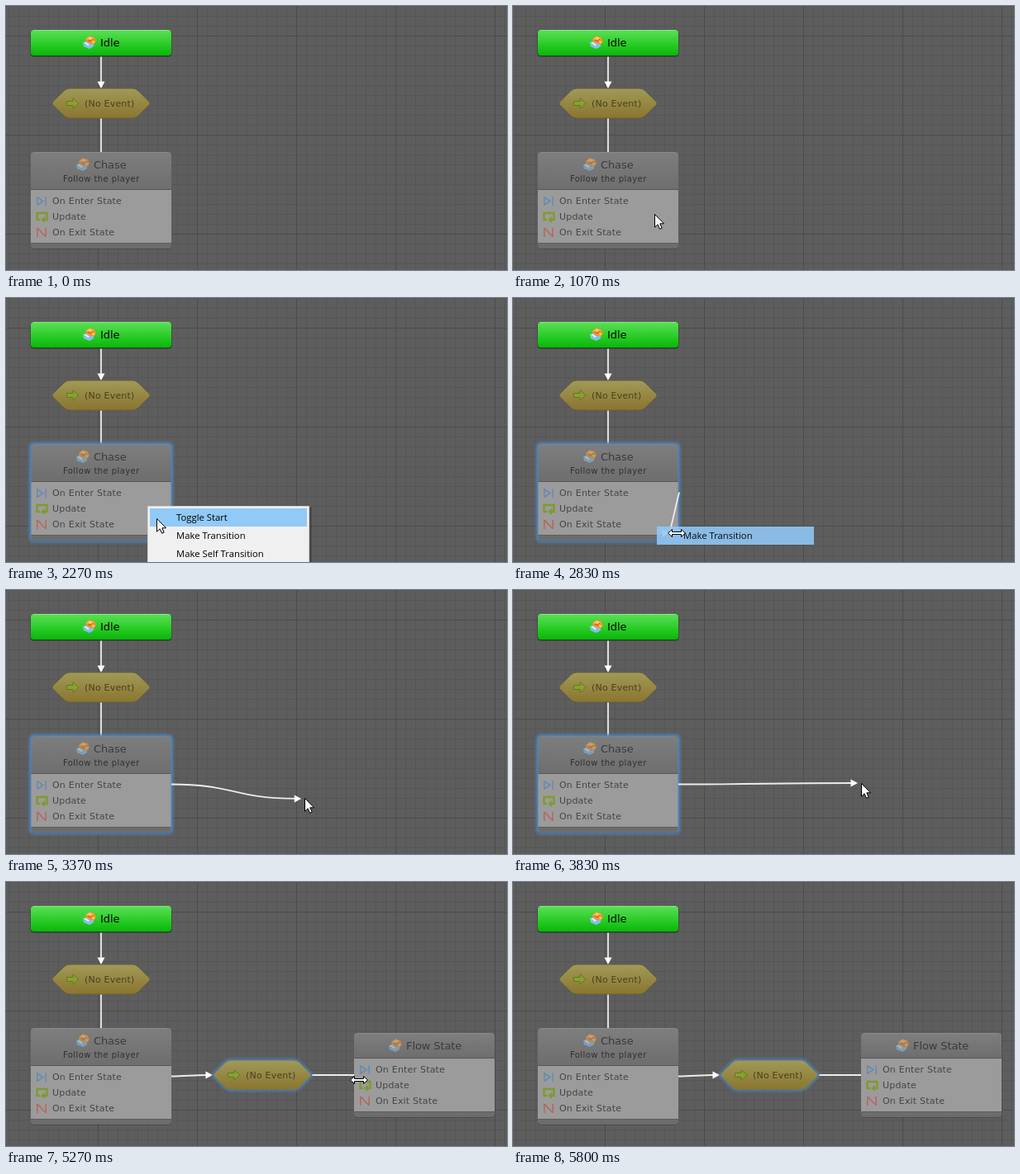
Recreate the animation shown at these times as an HTML page. Size 606 px wide and 320 px high, loop 7110 ms.

```html
<!DOCTYPE html>
<html lang="en">
<head>
<meta charset="utf-8">
<title>State graph</title>
<style>
  html, body { margin: 0; width: 100%; height: 100%; overflow: hidden; background: #5c5c5c; }
  svg { display: block; width: 606px; height: 320px; }
  text { font-family: "DejaVu Sans", Verdana, sans-serif; font-size: 11px; letter-spacing: .2px; white-space: pre; }
  .title { font-size: 13px; letter-spacing: -.1px; }
  .sub { font-size: 10px; letter-spacing: .42px; }
  .menu text { font-family: "Open Sans", "Segoe UI", sans-serif; font-size: 11.3px; letter-spacing: 0; fill: #000; }
  .edge { fill: none; stroke: #ececec; stroke-width: 1.8; }
  .head { fill: #fff; }
  .glow { fill: none; stroke: #4a86c6; stroke-width: 3; filter: url(#soft); }
  .rim { fill: none; stroke: #5583b3; stroke-width: 1; }
</style>
</head>
<body>
<svg id="stage" viewBox="0 0 606 320" xmlns="http://www.w3.org/2000/svg">
  <defs>
    <pattern id="minor" x="3" y="0" width="12" height="12" patternUnits="userSpaceOnUse">
      <path d="M.5 0V12M0 .5H12" stroke="#565656" fill="none"/>
    </pattern>
    <pattern id="major" x="111" y="36" width="120" height="120" patternUnits="userSpaceOnUse">
      <path d="M.5 0V120M0 .5H120" stroke="#4c4c4c" fill="none"/>
    </pattern>
    <linearGradient id="green" x2="0" y2="1">
      <stop offset="0" stop-color="#5cdf58"/><stop offset=".5" stop-color="#2fce2c"/><stop offset="1" stop-color="#08b808"/>
    </linearGradient>
    <linearGradient id="gray" x2="0" y2="1">
      <stop offset="0" stop-color="#7e7e7e"/><stop offset="1" stop-color="#6e6e6e"/>
    </linearGradient>
    <linearGradient id="gold" x2="0" y2="1">
      <stop offset="0" stop-color="#a09a57"/><stop offset="1" stop-color="#8a7530"/>
    </linearGradient>
    <filter id="soft" x="-20%" y="-20%" width="140%" height="140%"><feGaussianBlur stdDeviation="1.4"/></filter>

    <g id="machine">
      <path d="M3 4 8 0 14 2 16 7 13 11 7 10 3 8Z" fill="#f0932b"/>
      <path d="M4 4 8 1 13 3 10 5ZM11 6 15 7 12 10Z" fill="#ffc56e"/>
      <path d="M6 5 9 7 12 4" fill="none" stroke="#b85f16"/>
      <path d="M0 8 4 7 9 10 13 10 13 13 8 16 1 13Z" fill="#86bfe6"/>
      <path d="M1 8 4 8 8 11 6 12Z" fill="#e6f3fb"/>
    </g>
    <g id="enter" fill="none" stroke="#668bb3" stroke-width="1.5">
      <path d="M1.8 1V12M12.2 1V12M2 2 9 6.5 2 11"/>
    </g>
    <g id="update" fill="none" stroke="#7f9a2d" stroke-width="2.4">
      <path d="M5 10H1.5V2H13.5V10H10"/><path d="M11 6V14L6 10Z" fill="#7f9a2d" stroke="none"/>
    </g>
    <g id="exit" fill="none" stroke="#b9655c" stroke-width="1.5">
      <path d="M1.8 1V12M12.2 1V12M2.5 1.5 7 6.5 12 11.5"/>
    </g>
    <path id="go" d="M.5 4.5H8V.8L15 7 8 13.2V9.5H.5Z" fill="#87a52c" stroke="#5f7522"/>
    <path id="arrow" d="M.5.5V16.2L4.1 12.8 6.6 18.3 9.2 17.1 6.8 11.8H11.6Z" fill="#fff" stroke="#000"/>
    <path id="resize" d="M-10.5 0-5.5-4.5V-1.5H5.5V-4.5L10.5 0 5.5 4.5V1.5H-5.5V4.5Z" fill="#fff" stroke="#000"/>
  </defs>
  <rect width="606" height="320" fill="#5d5d5d"/>
  <rect width="606" height="320" fill="url(#minor)"/>
  <rect width="606" height="320" fill="url(#major)"/>
  <g id="graph"></g>
</svg>
<script>
const LOOP = 7110;
const HEX = 'M3 15 15 3Q18 0 22 0H98Q102 0 105 3L117 15Q121 18 117 21L105 33Q102 36 98 36H22Q18 36 15 33L3 21Q-1 18 3 15Z';
const $ = id => document.getElementById(id);

const label = (x, y, text, fill, cls = '') => `<text x="${x}" y="${y}" fill="${fill}" class="${cls}">${text}</text>`;
const icon = (id, x, y, opacity = 1) => `<use href="#${id}" x="${x}" y="${y}" opacity="${opacity}"/>`;
const head = (x, y, angle = 0) => `<path class="head" d="M-8.5-4.5 0 0-8.5 4.5Z" transform="translate(${x} ${y}) rotate(${angle})"/>`;
const edge = d => `<path class="edge" d="${d}"/>`;

function transition(x, y, glowing) {
  return `<g transform="translate(${x} ${y})">
    ${glowing ? `<path class="glow" d="${HEX}"/>` : ''}
    <path d="${HEX}" fill="url(#gold)" stroke="${glowing ? '#4d7497' : '#665e38'}" stroke-width=".8"/>
    ${icon('go', 18, 11, .9)}${label(40, 22, '(No Event)', '#48411f')}
  </g>`;
}

function stateNode(x, y, header, title, titleX, subtitle, glowId) {
  const height = header + 72, body = header + 1;
  const rows = [['enter', 'On Enter State'], ['update', 'Update'], ['exit', 'On Exit State']];
  return `<g transform="translate(${x} ${y})">
    ${glowId ? `<rect id="${glowId}" class="glow" x="-.5" y="-.5" width="171" height="${height + 1}" rx="4"/>` : ''}
    <rect y="1" width="170" height="${height}" rx="4" fill="#444" opacity=".6"/>
    <rect width="170" height="${height}" rx="4" fill="#6c6c6c"/>
    <path d="M0 ${header}V4Q0 0 4 0H166Q170 0 170 4V${header}Z" fill="url(#gray)"/>
    <path d="M4 .5H166" stroke="#8a8a8a"/>
    <path d="M0 ${header + .5}H170" stroke="#585858"/>
    <rect y="${body}" width="170" height="64" fill="#9b9b9b"/>
    <path d="M0 ${body + 64.5}H170" stroke="#5e5e5e"/>
    ${icon('machine', titleX - 21, 7, .55)}
    ${label(titleX, 20, title, '#3b3b3b', 'title')}
    ${subtitle ? label(39, 36, subtitle, '#303030', 'sub') : ''}
    ${rows.map(([id, text], i) => icon(id, 6, body + 7 + 19 * i) + label(26, body + 17 + 19 * i, text, '#454545')).join('')}
    ${glowId ? `<rect id="${glowId}Rim" class="rim" x="0" y="0" width="170" height="${height}" rx="4"/>` : ''}
  </g>`;
}

$('graph').innerHTML = `
  ${edge('M115 60V93')}${head(115, 100, 90)}${edge('M115 135V178')}
  <rect x="29.5" y="29" width="171" height="32.5" rx="4" fill="#2d3d2d"/>
  <rect x="30" y="29" width="170" height="31" rx="3.5" fill="url(#green)"/>
  <path d="M33 29.5H197" stroke="#84e880"/>
  ${icon('machine', 93, 36)}${label(114, 49, 'Idle', '#000', 'title')}
  ${transition(55, 100)}
  ${stateNode(30, 177, 45, 'Chase', 76, 'Follow the player', 'glow')}
  <g id="created">
    ${edge('M200 235.5C216 235.5 226 234 243 234')}${head(250, 234)}${edge('M370 234H421')}
    ${transition(250, 216, true)}
    ${stateNode(421, 183, 30, 'Flow State', 63)}
  </g>
  <g id="drag"><path id="wire" class="edge"/><g id="wireHead">${head(0, 0)}</g></g>
  <g id="menu" class="menu">
    <rect x="173" y="254" width="197" height="80" fill="#000" opacity=".2"/>
    <rect x="171.5" y="252.5" width="195" height="80" fill="#f0f0f0" stroke="#d0d0d0"/>
    <rect id="hover" x="174" width="190" height="22" fill="#91c9f7"/>
    ${label(206, 270, 'Toggle Start', '')}${label(206, 292, 'Make Transition', '')}${label(206, 314, 'Make Self Transition', '')}
  </g>
  <g id="picked" class="menu">
    <rect x="174" y="277" width="190" height="22" fill="#91c9f7"/>${label(206, 292, 'Make Transition', '')}
  </g>
  <g id="cursor"><use id="pointer"/></g>`;

// Each key is [time, x, y].
const mouseKeys = [
  [600, 242, 316], [740, 221, 293], [900, 187, 265], [1070, 171, 252],
  [2030, 171, 252], [2170, 176, 259], [2400, 190, 278], [2570, 197, 284],
  [2800, 197, 284], [2830, 198, 285], [3370, 361, 252], [3530, 402, 238],
  [3630, 418, 234], [3740, 418, 234], [3830, 421, 234], [4470, 422, 234],
  [5100, 422, 234], [5230, 430, 236], [5360, 420, 250], [5600, 373, 291], [5800, 338, 322]
];
const wireKeys = [[2830, 189, 285], [2930, 224, 280], [3370, 357, 253], [3530, 398, 238], [3630, 414, 234], [3740, 414, 234], [3830, 417, 234]];

const clamp = v => Math.max(0, Math.min(1, v));
function follow(keys, t) {
  const next = keys.findIndex(k => k[0] > t);
  if (next < 0) return keys[keys.length - 1].slice(1);
  if (next === 0) return keys[0].slice(1);
  const [t0, x0, y0] = keys[next - 1], [t1, x1, y1] = keys[next];
  const f = (t - t0) / (t1 - t0);
  return [x0 + (x1 - x0) * f, y0 + (y1 - y0) * f];
}
const show = (id, on) => $(id).setAttribute('visibility', on ? 'visible' : 'hidden');
const within = (t, from, to) => t >= from && t < to;

function render(t) {
  const [x, y] = follow(mouseKeys, t).map(Math.round);
  show('cursor', within(t, 600, 5800));
  const resizing = (within(t, 2830, 3000) && x < 208) || (t >= 4470 && x > 412);
  $('pointer').setAttribute('href', resizing ? '#resize' : '#arrow');
  $('cursor').setAttribute('transform', `translate(${x} ${y})`);

  const selected = within(t, 1470, 4470);
  show('glow', selected);
  show('glowRim', selected);
  show('created', t >= 4470);

  show('menu', within(t, 1470, 2830));
  $('menu').setAttribute('opacity', clamp((t - 1440) / 290));
  show('hover', within(t, 2030, 2830));
  $('hover').setAttribute('y', y < 277 ? 255 : 277);
  show('picked', within(t, 2830, 3130));
  $('picked').setAttribute('opacity', .88 * clamp((3130 - t) / 300));

  show('drag', within(t, 2830, 4470));
  const [ex, ey] = follow(wireKeys, t);
  const tail = ex - 7, mid = (201 + tail) / 2;
  $('wire').setAttribute('d', ex < 210 ? `M201 235.5L${ex} ${ey}` : `M200 235.5C${mid} 235.5 ${mid} ${ey} ${tail} ${ey}`);
  $('wireHead').setAttribute('transform', `translate(${ex} ${ey})`);
}

const start = performance.now();
function tick() {
  render((performance.now() - start) % LOOP);
  requestAnimationFrame(tick);
}
render(0);
requestAnimationFrame(tick);
</script>
</body>
</html>
```
